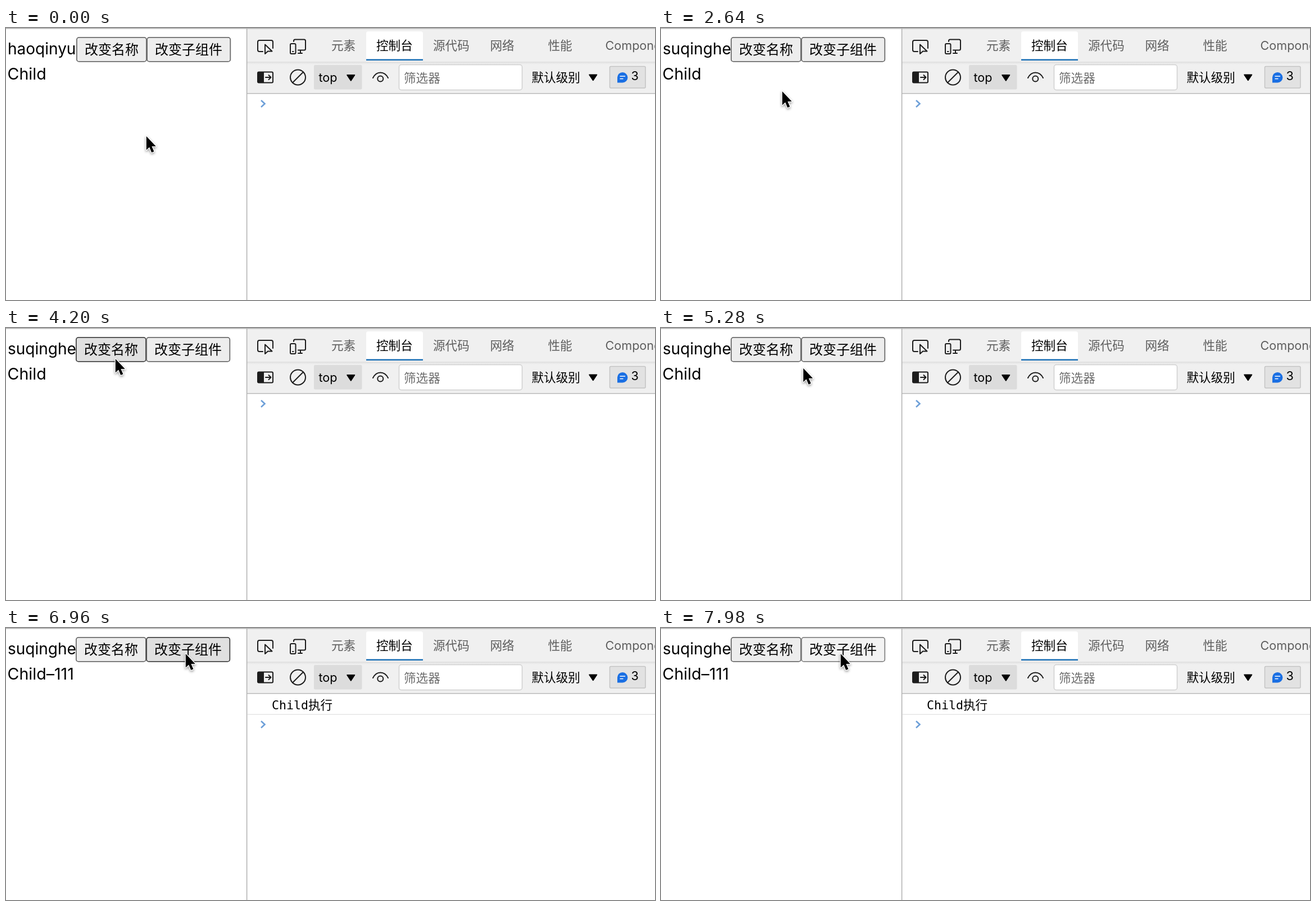
Write an HTML page that moves like this. It is 1155 by 485 pixels and loops after 8 s.

```html
<!DOCTYPE html>
<html lang="zh-CN">
<head>
<meta charset="utf-8">
<title>Console demo</title>
<style>
  html, body { margin: 0; width: 100%; height: 100%; overflow: hidden; background: #fff; }
  svg { display: block; width: 1155px; height: 485px; cursor: default; }
  text { font: 21.6px Inter, "Noto Sans CJK SC", "Noto Sans CJK", sans-serif; }
  #name { font-size: 28px; }
  .page { font-size: 28.6px; }
  .btn text { font-size: 24px; }
  .btn rect { stroke-width: 1.8; }
  .tab { fill: #5e5e5e; }
  .log { font-family: "DejaVu Sans Mono", "Noto Sans CJK SC", "Noto Sans CJK", monospace; }
  .icon { fill: none; stroke: #1c1c1c; stroke-width: 2; stroke-linejoin: round; stroke-linecap: round; }
  #cursor { filter: drop-shadow(0 2px 2px rgba(0, 0, 0, .4)); }
</style>
</head>
<body>
<svg viewBox="0 0 1155 485" lang="zh-CN">
  <defs>
    <linearGradient id="fade" x2="0" y2="1">
      <stop stop-color="#dedede"/><stop offset="1" stop-color="#f0f0f0"/>
    </linearGradient>
  </defs>

  <!-- page -->
  <text id="name" x="3" y="47"></text>
  <text class="page" x="2.500" y="91.500">Child<tspan id="suffix">–111</tspan></text>
  <g id="buttons">
    <g class="btn"><rect x="125.9" y="16.9" width="124" height="43" rx="4"/><text x="140" y="46.7">改变名称</text></g>
    <g class="btn"><rect x="251.1" y="16.9" width="148.2" height="43" rx="4"/><text x="265" y="46.7">改变子组件</text></g>
  </g>

  <!-- tool panel -->
  <rect x="429" y="1" width="726" height="115" fill="#f0f0f0"/>
  <rect x="429" y="60" width="726" height="5" fill="url(#fade)"/>
  <rect x="429" y="116" width="726" height="1.5" fill="#bababa"/>
  <rect x="427.8" width="1.6" height="485" fill="#b4b4b4"/>
  <rect width="1155" height="1.6" fill="#b4b4b4"/>

  <path d="M641 58V10a4 4 0 0 1 4-4h93a4 4 0 0 1 4 4v48z" fill="#fff"/>
  <rect x="641" y="55.5" width="101" height="2.5" fill="#1a6fb5"/>
  <g class="tab">
    <text x="579" y="39">元素</text>
    <text x="659" y="39" fill="#000">控制台</text>
    <text x="760" y="39">源代码</text>
    <text x="861.5" y="39">网络</text>
    <text x="964.5" y="39">性能</text>
    <text x="1066.500" y="39">Components</text>
  </g>

  <g class="icon">
    <path d="M457 42h-6a3 3 0 0 1-3-3V25a3 3 0 0 1 3-3h21a3 3 0 0 1 3 3v11"/>
    <path d="M461 29.5v16.500l5-4.500h7.500z"/>
    <rect x="506" y="28" width="9.500" height="18" rx="2"/>
    <path d="M512 24v-1a2.500 2.500 0 0 1 2.500-2.500h16a2.500 2.500 0 0 1 2.500 2.500v14a2.500 2.500 0 0 1-2.500 2.500H520M520 45h7M524 40v5M510 42h1.500"/>
    <rect x="448" y="78.500" width="27" height="19" rx="2"/>
    <path d="M449 79h9v18h-9z" fill="#1c1c1c"/>
    <path d="M462 88h9M467.500 84l4 4-4 4"/>
    <circle cx="519.500" cy="88" r="13.500"/>
    <path d="M510 97.500l19-19"/>
    <path d="M653 89c3-6 8-9.500 13.300-9.500S677 83 680 89"/>
    <circle cx="666.300" cy="90.500" r="5"/>
  </g>

  <rect x="548" y="66" width="85.500" height="43.500" rx="2" fill="#dcdcdc"/>
  <text x="556.500" y="95.500">top</text>
  <path d="M607 83h13.500q1.500 0 .5 1.500l-6.200 9.500q-1 1.500-2 0l-6.300-9.500q-1-1.500.5-1.500z"/>
  <rect x="699.500" y="65.500" width="219" height="45" rx="4" fill="#fff" stroke="#cfcfcf" stroke-width="1.500"/>
  <text x="708" y="96.700" fill="#6c6c6c">筛选器</text>
  <text x="935.500" y="95.700">默认级别</text>
  <path d="M1038 82.500h13.500q1.500 0 .5 1.500l-6.200 9.500q-1 1.500-2 0l-6.300-9.500q-1-1.500.5-1.500z"/>
  <rect x="1074.500" y="68.500" width="63.500" height="38.500" rx="2" fill="#e2e2e2" stroke="#c4c4c4" stroke-width="1.500"/>
  <path d="M1088 97.500v-9.500a9.200 9.200 0 1 1 9.200 9.500z" fill="#1a6fe3"/>
  <path d="M1092.500 86h9.500M1092.500 90.500h6" stroke="#fff" stroke-width="1.700"/>
  <text x="1112.500" y="92.500">3</text>

  <!-- console -->
  <g id="log">
    <text class="log" x="473" y="145">Child执行</text>
    <rect x="429" y="153.500" width="726" height="1.200" fill="#dedede"/>
  </g>
  <path id="prompt" d="M454 129l6.500 6-6.500 6" fill="none" stroke="#6c9fd8" stroke-width="2.600"/>

  <path id="cursor" d="M.8 2v24.500l5.400-5 4 9.500 4.200-1.800-4-9.200h7.400z"
        stroke="#fff" stroke-width="2.600" paint-order="stroke" stroke-linejoin="round"/>
</svg>
<script>
const LOOP = 8000, STEP = 60;
const NAME_AT = 1560, LOG_AT = 5940;
const $ = id => document.getElementById(id);
const buttons = [...document.querySelectorAll('.btn rect')];

// pointer path: time, x, y
const path = [
  [60, 249, 191], [780, 212, 47], [960, 211, 44], [1680, 211, 44],
  [2220, 213, 103], [2640, 215, 111], [2880, 215, 111], [3600, 194, 58],
  [3720, 194, 58], [4140, 194, 53], [4500, 194, 53], [4740, 206, 90],
  [4920, 206, 90], [5700, 311, 44], [6180, 311, 44], [6960, 319, 44]
];

// clicking spells: start, end, with a press every 300 ms
const clicks = [[1440, 1560], [3780, 4440], [5820, 5940], [6420, 8000]];

const looks = {
  idle: ['#ededed', '#6c6c6c'],
  hover: ['#e0e0e0', '#444'],
  down: ['#f3f3f3', '#858585']
};

function pointer(t) {
  const i = path.findIndex(p => p[0] > t);
  if (i === 0) return path[0].slice(1);
  if (i < 0) return path[path.length - 1].slice(1);
  const [t0, x0, y0] = path[i - 1], [t1, x1, y1] = path[i];
  const u = (t - t0) / (t1 - t0), e = u * u * (3 - 2 * u);
  return [x0 + (x1 - x0) * e, y0 + (y1 - y0) * e];
}

const pressed = t => clicks.some(([a, b]) => t >= a && t < b && (t - a) % 300 < 120);

function draw(t) {
  const [x, y] = pointer(t);
  const renamed = t >= NAME_AT, logged = t >= LOG_AT;
  $('cursor').setAttribute('transform', `translate(${x} ${y})`);
  $('name').textContent = renamed ? 'suqinghe' : 'haoqinyu';
  $('buttons').setAttribute('transform', `translate(${renamed ? -1 : 0} 0)`);
  $('suffix').style.display = $('log').style.display = logged ? '' : 'none';
  $('prompt').setAttribute('transform', `translate(0 ${logged ? 37 : 0})`);

  const over = y > 60 ? -1 : x < 250 ? 0 : 1;
  buttons.forEach((b, i) => {
    const [fill, stroke] = looks[i !== over ? 'idle' : pressed(t) ? 'down' : 'hover'];
    b.setAttribute('fill', fill);
    b.setAttribute('stroke', stroke);
  });
}

const start = performance.now();
function tick() {
  const t = (performance.now() - start) % LOOP;
  draw(Math.floor(t / STEP) * STEP);
  requestAnimationFrame(tick);
}
draw(0);
requestAnimationFrame(tick);
</script>
</body>
</html>
```
